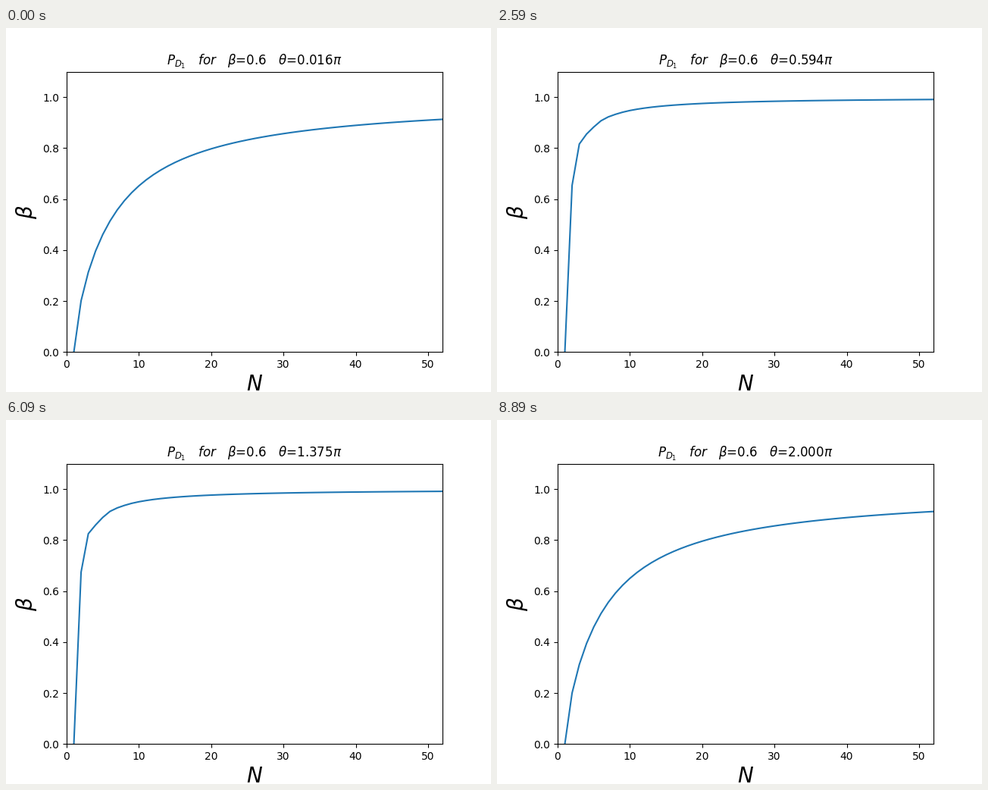
Write a matplotlib script that moves like this. It is 640 by 480 pixels and loops after 8.96 s.

```python
import numpy as np
import matplotlib.pyplot as plt
from matplotlib.animation import FuncAnimation

BETA = 0.6
FRAMES = 128
STEP_MS = 70
N = np.arange(1, 55)


def survival(n, z):
    """Amplitude left in the first arm after n splitters, second arm scaled by z."""
    c, s = np.cos(np.pi / (2 * n)), np.sin(np.pi / (2 * n))
    a, b = c, s
    for _ in range(n - 1):
        b = b * z
        a, b = c * a - s * b, s * a + c * b
    return abs(a)


fig, ax = plt.subplots(figsize=(6.4, 4.8), dpi=100)
line, = ax.plot([], [], color="#1f77b4", lw=1.5)
ax.set_xlim(0, 52)
ax.set_ylim(0, 1.1)
ax.set_xlabel("$N$", fontsize=20)
ax.set_ylabel(r"$\beta$", fontsize=20)
title = ax.set_title("", fontsize=12)


def update(i):
    turn = 2 * (i + 1) / FRAMES
    z = BETA * np.exp(1j * np.pi * turn)
    line.set_data(N, [survival(int(n), z) for n in N])
    title.set_text(rf"$P_{{D_1}}\quad for\quad \beta$={BETA}$\quad \theta$={turn:.3f}$\pi$")
    return line, title


anim = FuncAnimation(fig, update, frames=FRAMES, interval=STEP_MS,
                     repeat=True, repeat_delay=0, blit=False)
plt.show()
```
